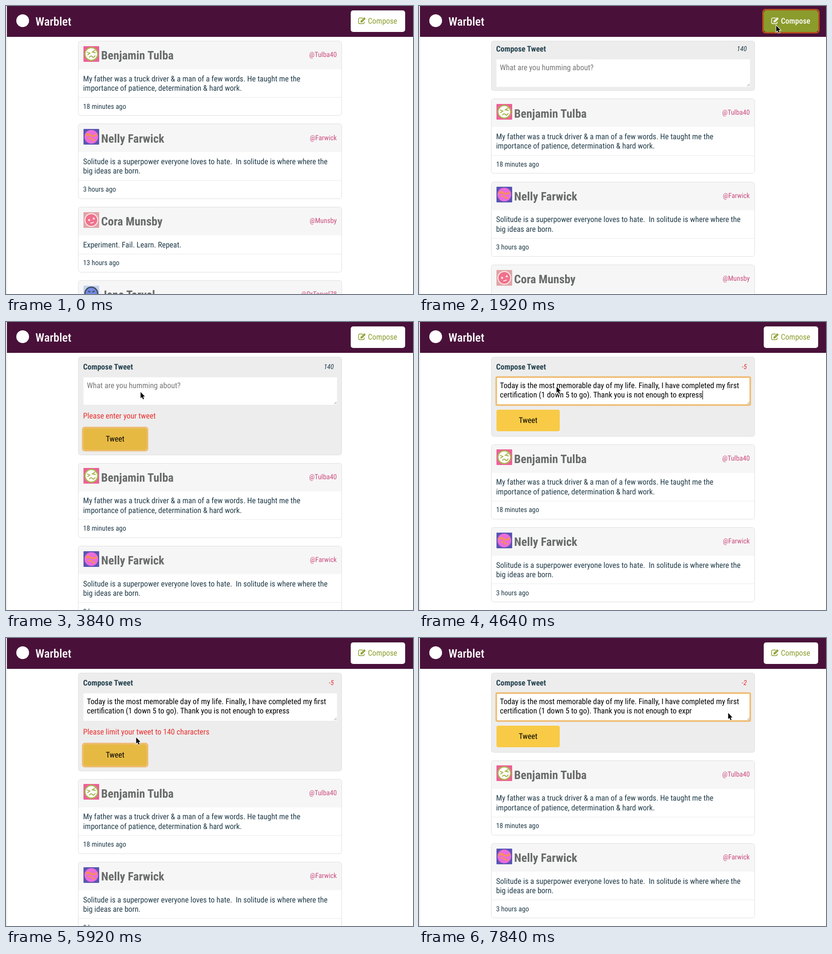
These frames come from a looping animation (830x588 px, 8 s). An HTML page with a canvas:

```html
<!DOCTYPE html>
<html lang="en">
<head>
<meta charset="utf-8">
<title>Microblog demo</title>
<style>
html, body { margin: 0; width: 100%; height: 100%; overflow: hidden; background: #fff; }
canvas { display: block; }
</style>
</head>
<body>
<canvas id="stage" width="830" height="588"></canvas>
<script>
const ctx = document.getElementById('stage').getContext('2d');
ctx.textRendering = 'geometricPrecision';
const LOOP = 8000, STEP = 160;
const INK = '#203b49', OLIVE = '#8b9c2c', RED = '#e8302e';
const FACE = '"Roboto Condensed", Roboto, sans-serif';
const DRAFT = [
  'Today is the most memorable day of my life. Finally, I have completed my first',
  'certification (1 down 5 to go). Thank you is not enough to express'
];
const POSTS = [
  { name: 'Benjamin Tulba', user: '@Tulba40', age: '18 minutes ago', face: faceWink,
    text: ['My father was a truck driver & a man of a few words. He taught me the',
           'importance of patience, determination & hard work.'] },
  { name: 'Nelly Farwick', user: '@Farwick', age: '3 hours ago', face: faceSwirl,
    text: ['Solitude is a superpower everyone loves to hate.\u00a0 In solitude is where where the',
           'big ideas are born.'] },
  { name: 'Cora Munsby', user: '@Munsby', age: '13 hours ago', face: faceStars,
    text: ['Experiment. Fail. Learn. Repeat.'] },
  { name: 'Jane Torvel', user: '@DrTorvel78', age: '20 hours ago', face: faceBlue,
    text: ['Keep going.'] }
];

// time, x, y of the pointer tip
const PATH = [
  [160, 640, 570], [800, 706, 250], [960, 706, 250], [1120, 722, 120], [1280, 722, 120],
  [1440, 728, 40], [2240, 728, 40], [3040, 240, 204], [3360, 240, 204], [4000, 280, 132],
  [4960, 280, 132], [5600, 265, 203], [6240, 265, 203], [6720, 630, 153], [8000, 630, 153]
];
const CLICKS = [1600, 3040, 4000, 5600, 7040];

// Falls back to one global narrowing when no condensed face is installed
function narrowing() {
  const probe = 'Solitude is a superpower';
  ctx.font = '16px Roboto, sans-serif';
  const wide = ctx.measureText(probe).width;
  ctx.font = 'condensed 16px ' + FACE;
  return ctx.measureText(probe).width < wide * 0.95 ? 1 : 0.885;
}
const NARROW = narrowing();

// Draws a line of text and returns its right end
function text(str, x, y, { size = 16, color = INK, style = '', align = 'left' } = {}) {
  ctx.font = `${style} condensed ${size}px ${FACE}`;
  ctx.fillStyle = color;
  const w = ctx.measureText(str).width * NARROW;
  if (align === 'right') x -= w;
  if (align === 'center') x -= w / 2;
  ctx.save();
  ctx.translate(x, Math.round(y));
  ctx.scale(NARROW, 1);
  ctx.fillText(str, 0, 0);
  ctx.restore();
  return x + w;
}

function rect(x, y, w, h, color) {
  ctx.fillStyle = color;
  ctx.fillRect(x, y, w, h);
}

function paint(fill, stroke, line) {
  if (fill) { ctx.fillStyle = fill; ctx.fill(); }
  if (stroke) { ctx.strokeStyle = stroke; ctx.lineWidth = line; ctx.stroke(); }
}

function box(x, y, w, h, r, fill, stroke, line = 1) {
  ctx.beginPath();
  ctx.roundRect(x, y, w, h, r);
  paint(fill, stroke, line);
}

function disc(x, y, r, fill, stroke, line = 1) {
  ctx.beginPath();
  ctx.arc(x, y, r, 0, 7);
  paint(fill, stroke, line);
}

function strokePath(d, color, line) {
  ctx.strokeStyle = color;
  ctx.lineWidth = line;
  ctx.stroke(new Path2D(d));
}

function fillPath(d, color) {
  ctx.fillStyle = color;
  ctx.fill(new Path2D(d));
}

// Soft focus ring along the edge of a box
function halo(x, y, w, h, r) {
  box(x - 0.5, y - 0.5, w + 1, h + 1, r, null, 'rgba(240,178,84,.4)', 4);
  box(x - 0.5, y - 0.5, w + 1, h + 1, r, null, '#edb25c', 2);
}

function faceWink() {
  rect(0, 0, 32, 32, '#ee6097');
  disc(16, 16, 13, '#fff', '#aab552', 2.6);
  strokePath('M7 12 L13 14.5 L8 18 M24 8 L18 12 L25 13.5', '#a5b04a', 1.8);
  strokePath('M12 23 Q15 18 18 21.5 T24 19', '#a5b04a', 2);
}

function faceSwirl() {
  rect(0, 0, 32, 32, '#5b55b4');
  disc(16, 16, 14, '#ea6cdb');
  fillPath('M4 11 Q10 6 15 11 Q20 15 27 9 L28 14 Q20 18 14 15 Q9 12 5 16 Z', '#f78c62');
  strokePath('M9 20 Q14 17 17 21 T24 22', '#f78c62', 3);
}

function star(x, y) {
  ctx.beginPath();
  for (let i = 0; i < 10; i++) {
    const r = i % 2 ? 1.3 : 3, a = i * Math.PI / 5 - Math.PI / 2;
    ctx.lineTo(x + r * Math.cos(a), y + r * Math.sin(a));
  }
  paint('#fff');
}

function faceStars() {
  rect(0, 0, 32, 32, '#e0a3a7');
  disc(16, 16, 13, '#f0718d', '#fbe9e6', 2);
  star(11.5, 16);
  star(21, 13);
  strokePath('M14 22.5 L21 20.5', '#fff', 1.8);
}

function faceBlue() {
  rect(0, 0, 32, 32, '#c4d2ee');
  disc(16, 16, 13, '#7289df', '#414a5c', 2.6);
  strokePath('M9 11 L14 13 M23 11 L18 13 M11 21 Q16 17 21 21', '#414a5c', 2);
}

function post(p, y) {
  const extra = (p.text.length - 1) * 19.2;
  const top = Math.round(y), h = Math.round(y + 134 + extra) - top;
  box(147.5, top + 0.5, 537, h - 1, 5, '#fff');
  box(148, top + 1, 536, 57, [5, 5, 0, 0], '#f6f6f6');
  rect(148, Math.round(y + 96.2 + extra), 536, 1, '#ececec');
  box(147.5, top + 0.5, 537, h - 1, 5, null, '#e0e0e0');
  ctx.save();
  ctx.translate(158, Math.round(y + 10.8));
  ctx.beginPath();
  ctx.roundRect(0, 0, 32, 32, 1);
  ctx.clip();
  p.face();
  ctx.restore();
  text(p.name, 194, y + 38.4, { size: 24, style: 'bold', color: '#686b6a' });
  text(p.user, 674.6, y + 33.2, { size: 14.4, color: '#cb4d7e', align: 'right' });
  p.text.forEach((s, i) => text(s, 157.2, y + 82.8 + i * 19.2));
  text(p.age, 157.2, y + 119.6 + extra, { size: 14.4 });
}

function pencil(x, y, color, back) {
  ctx.save();
  ctx.translate(x, y);
  strokePath('M9.5 2.5 H3.5 Q1 2.5 1 5 V11.5 Q1 14 3.5 14 H10 Q12.5 14 12.5 11.5 V10', color, 1.4);
  fillPath('M5 11.5 V8.5 L12.5 1 L15.5 4 L8 11.5 Z', color);
  strokePath('M7 8.8 L12.2 3.6', back, 0.6);
  ctx.restore();
}

function header(s) {
  rect(2, 0, 828, 63, '#49113a');
  disc(34, 30, 13, '#fff');
  text('Warblet', 60, 40, { size: 24, style: '500', color: '#fff' });
  if (s.composeFocus) box(701.5, 7.5, 114, 47, 5, null, '#b5521d', 3);
  const [color, back] = s.composeHot ? ['#fff', OLIVE] : [OLIVE, '#fff'];
  box(703, 9, 111, 44, 5, back);
  pencil(718, 22, color, back);
  text('Compose', 738, 36, { color, style: s.composeHot ? '500' : '' });
}

function composer(s) {
  const h = Math.round(162.6 * s.open + (s.error ? 38 : 0));
  ctx.save();
  box(147.5, 71.5, 537, Math.max(h - 1, 1), 5, '#ededed', '#e0e0e0');
  ctx.clip();
  ctx.translate(0, Math.round(-11 * (1 - s.open)));
  text('Compose Tweet', 157.2, 97, { style: 'bold', color: '#24424f' });
  const left = s.draft ? s.erased - 5 : 140;
  text(String(left), 668.4, 96, { size: 14, style: 'italic', align: 'right', color: left < 0 ? RED : INK });

  rect(158, 113, 517, 56, '#fff');
  strokePath('M669.5 167.5 L674 163 M672.5 167.5 L674 166', '#777', 0.9);
  if (s.areaFocus) halo(158, 113, 517, 56, 2);
  let caretX = 165, caretY = 121;
  if (s.draft) {
    text(DRAFT[0], 165, 135, { color: '#000' });
    const tail = DRAFT[1].slice(0, DRAFT[1].length - s.erased);
    caretX = Math.round(text(tail, 165, 154, { color: '#000' }));
    caretY = 140;
  } else {
    text('What are you humming about?', 165, 135, { color: '#757575' });
  }
  if (s.caret) rect(caretX, caretY, 1, 18, '#000');

  if (s.error) text(s.error, 157.2, 197, { color: RED });
  const by = s.error ? 217 : 179;
  if (s.tweetFocus) halo(157, by - 1, 131, 46, 4);
  box(158, by, 129, 44, 4, s.tweetFocus ? '#e6b943' : '#f8ca46');
  text('Tweet', 222.4, by + 27, { color: '#000', align: 'center' });
  ctx.restore();
}

function pointer(t) {
  if (t < PATH[0][0]) return;
  const i = PATH.findIndex(k => k[0] > t);
  const [t0, x0, y0] = PATH[i - 1], [t1, x1, y1] = PATH[i];
  const u = (t - t0) / (t1 - t0), e = u * u * (3 - 2 * u);
  const x = Math.round(x0 + (x1 - x0) * e), y = Math.round(y0 + (y1 - y0) * e);
  if (CLICKS.includes(t)) {
    disc(x + 4, y + 7.5, 17, null, '#fff', 1.2);
    disc(x + 4, y + 7.5, 16, null, '#000', 1.2);
  }
  ctx.save();
  ctx.translate(x, y);
  const arrow = 'M.5 0 V12.5 L3.2 10 L5.3 14.8 L7.4 13.9 L5.4 9.2 H9.2 Z';
  strokePath(arrow, '#fff', 2);
  fillPath(arrow, '#000');
  ctx.restore();
}

function stateAt(t) {
  const within = (a, b) => t >= a && t < b;
  const u = Math.min(Math.max((t - 1687) / 400, 0), 1);
  const areaFocus = within(2080, 3200) || within(4000, 5760) || t >= 7040;
  return {
    open: 0.5 - 0.5 * Math.cos(Math.PI * u),
    composeHot: within(1760, 3200),
    composeFocus: within(1760, 2080),
    areaFocus,
    caret: areaFocus && t < 7360,
    tweetFocus: within(3200, 4000) || within(5760, 7040),
    draft: t >= 4480,
    erased: (t >= 7360) + (t >= 7680) + (t >= 7840),
    error: within(3200, 4480) ? 'Please enter your tweet'
      : within(5760, 7360) ? 'Please limit your tweet to 140 characters' : ''
  };
}

function draw(t) {
  const s = stateAt(t);
  rect(0, 0, 830, 588, '#fff');
  rect(1, 0, 1, 588, '#dcdcdc');
  header(s);
  let y = 71;
  if (s.open > 0) {
    composer(s);
    y += 162.6 * s.open + 16 + (s.error ? 38 : 0);
  }
  for (const p of POSTS) {
    if (y < 588) post(p, y);
    y += 150.2 + (p.text.length - 1) * 19.2;
  }
  pointer(t);
}

let shown = -1;
function tick() {
  const t = Math.floor(performance.now() % LOOP / STEP) * STEP;
  if (t !== shown) draw(shown = t);
  requestAnimationFrame(tick);
}
tick();
</script>
</body>
</html>
```
